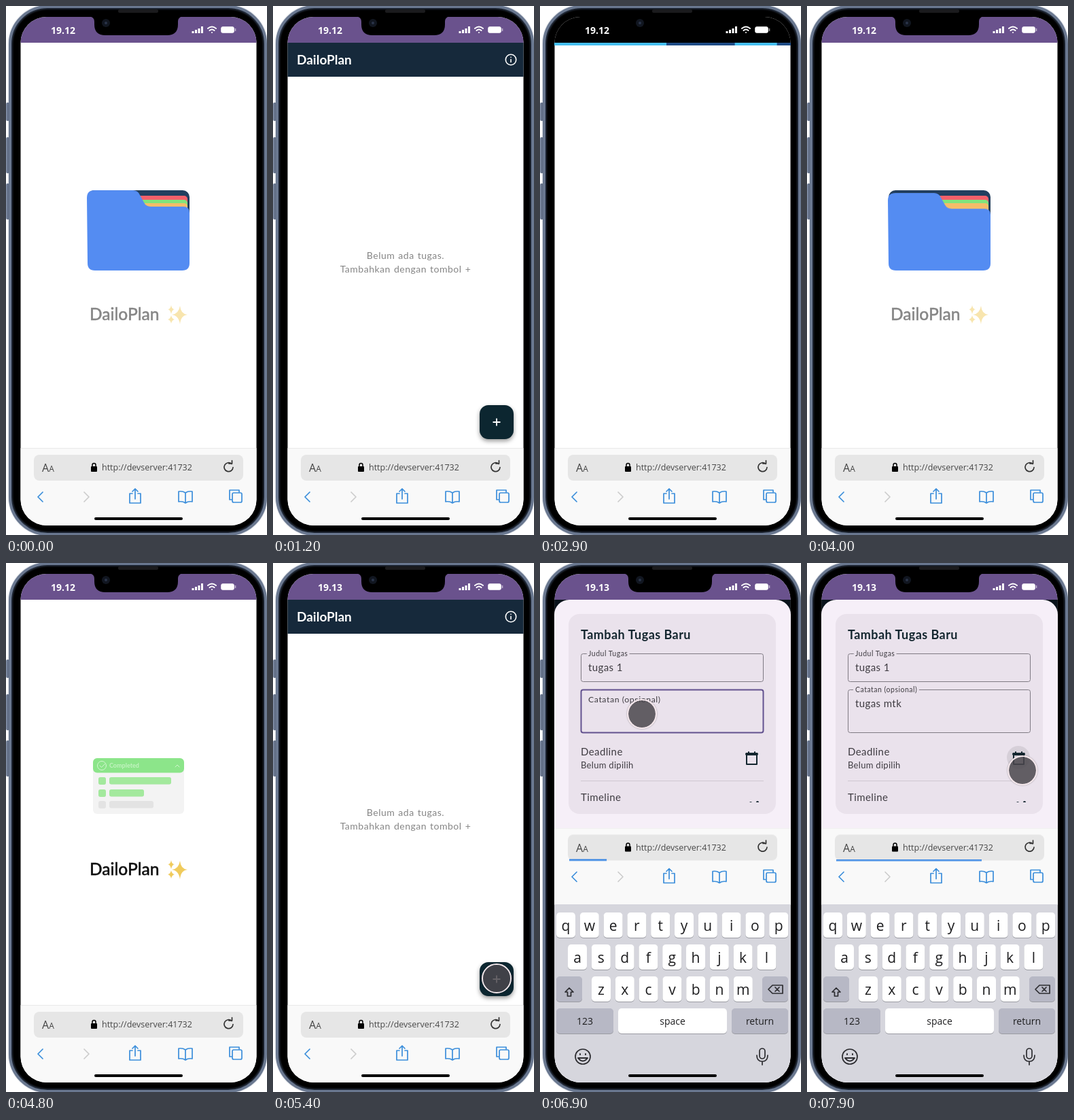
Write an HTML page that moves like this. It is 384 by 778 pixels and loops after 8 s.

```html
<!DOCTYPE html>
<html lang="id">
<head>
<meta charset="utf-8">
<title>To-do app demo</title>
<style>
  html, body { margin: 0; width: 100%; height: 100%; overflow: hidden; background: #fff; }
  #stage { position: relative; width: 384px; height: 778px; overflow: hidden; font-family: Lato, sans-serif; }
  #stage div, #stage > svg, #screen > svg { position: absolute; }
  svg { display: block; overflow: visible; }
  .full { left: 0; top: 0; width: 384px; height: 778px; }
  .ui { font-family: "Open Sans", sans-serif; }
  .line { fill: none; stroke-linecap: round; stroke-linejoin: round; }

  .button { left: 0; width: 5px; border-radius: 2px; background: linear-gradient(90deg, #8b98b0, #36435c); }
  #body { left: 4px; top: -1px; width: 372px; height: 772px; border: 4px solid #6a7890; border-radius: 57px;
    background: #000; box-shadow: inset 0 0 0 1px #1d2635, inset 0 0 3px 1px #46546c, 0 0 2px #8d98ab; }
  #screen { left: 0; top: 0; width: 384px; height: 778px; background: #fff;
    clip-path: inset(16px 15.5px 14px 21.5px round 38px); }
  #status { left: 0; top: 0; width: 384px; height: 54px; background: #6a528d; animation: status 8s step-end infinite; }
  @keyframes status { 0% { background: #6a528d } 31.25% { background: #000 } 43.75% { background: #6a528d } }

  /* scenes */
  #splash { animation: splash 8s step-end infinite; }
  @keyframes splash { 0% { opacity: 1 } 13.1% { opacity: 0 } 45% { opacity: 1 } 64.4% { opacity: 0 } }
  #home { animation: home 8s step-end infinite; }
  @keyframes home { 0% { opacity: 0 } 13.1% { opacity: 1 } 31.25% { opacity: 0 } 64.4% { opacity: 1 } }
  #loader { left: 21px; top: 54px; width: 348px; height: 4px; overflow: hidden; background: #45bff0;
    animation: loader 8s step-end infinite; }
  @keyframes loader { 0% { opacity: 0 } 31.25% { opacity: 1 } 43.75% { opacity: 0 } }
  #loader i { position: absolute; top: 0; left: 1px; width: 264px; height: 4px;
    background: repeating-linear-gradient(90deg, #1f4c86 0 101px, transparent 101px 163px);
    animation: run 1s -.8s linear infinite; }
  @keyframes run { from { transform: translateX(-264px) } to { transform: translateX(346px) } }

  /* splash, same phase every 4 s */
  #brand { animation: brand 4s linear infinite; }
  @keyframes brand {
    0% { opacity: .5; transform: translateY(3px) } 10%, 85% { opacity: 1; transform: none }
    85.1%, 90% { opacity: 0; transform: translateY(6px) } 100% { opacity: .5; transform: translateY(3px) } }
  #folder { transform-origin: 195px 330px; animation: folder 4s linear infinite; }
  @keyframes folder {
    0%, 8%, 88%, 100% { opacity: 1; transform: none } 12%, 85% { opacity: 0; transform: scale(.9) } }
  #flap { transform-origin: 195px 389px; animation: flap 8s linear infinite; }
  @keyframes flap {
    0% { transform: none } 6% { transform: scaleY(.82) } 40%, 46% { transform: none }
    50% { transform: scaleY(.966) } 55%, 100% { transform: scaleY(.82) } }
  #list { transform-origin: 195px 328px; animation: list 4s ease-out infinite; }
  @keyframes list {
    0%, 10% { opacity: 0; transform: scale(.85) } 15%, 80% { opacity: 1; transform: none }
    85%, 100% { opacity: 0; transform: none } }
  .fill { transform-origin: 136px 0; animation: 4s linear infinite; }
  #r1 { animation-name: r1 } #r2 { animation-name: r2 } #r3 { animation-name: r3 }
  @keyframes r1 { 0%, 12% { transform: scaleX(0) } 15%, 100% { transform: none } }
  @keyframes r2 { 0%, 16% { transform: scaleX(0) } 19.5%, 100% { transform: none } }
  @keyframes r3 { 0%, 20.5% { transform: scaleX(0) } 25%, 100% { transform: none } }

  /* task sheet */
  #view { left: 21px; top: 54px; width: 348px; height: 596px; overflow: hidden; animation: view 8s infinite; }
  @keyframes view {
    0%, 81.25% { height: 596px; animation-timing-function: ease-out } 83.75%, 100% { height: 336px } }
  #scrim { inset: 0; background: #0008; animation: scrim 8s linear infinite; }
  @keyframes scrim { 0%, 68.5% { opacity: 0 } 71.5%, 100% { opacity: 1 } }
  #sheet { inset: 0; background: #f6eff8; border-radius: 22px 22px 0 0; display: flex; align-items: center;
    animation: sheet 8s infinite; }
  @keyframes sheet {
    0%, 68.5% { transform: translateY(600px); animation-timing-function: ease-out } 71.5%, 100% { transform: none } }
  #card { left: 21px; width: 305px; height: 380px; max-height: calc(100% - 42px); border-radius: 16px; background: #eae2ec; }
  #clip { inset: 0 0 17px; overflow: hidden; }
  #card text { font-size: 15px; letter-spacing: .4px; fill: #3f3c42; }
  #card .sub { font-size: 13px; letter-spacing: .3px; }
  #card .label { font-size: 10.5px; letter-spacing: .5px; paint-order: stroke; stroke: #eae2ec; stroke-width: 7px; }
  .box { fill: none; stroke: #7f7a83; }
  #titleBox { animation: focus1 8s step-end infinite; }
  @keyframes focus1 { 0% { stroke: #7f7a83; stroke-width: 1px } 72.5% { stroke: #63528f; stroke-width: 2px }
    85.6% { stroke: #7f7a83; stroke-width: 1px } }
  #noteBox { animation: focus2 8s step-end infinite; }
  @keyframes focus2 { 0% { stroke: #7f7a83; stroke-width: 1px } 85.6% { stroke: #63528f; stroke-width: 2px }
    95% { stroke: #7f7a83; stroke-width: 1px } }
  #titleLabel { animation: label1 8s linear infinite; }
  @keyframes label1 {
    0%, 72.5% { transform: translate(29px, 84px) scale(1.38); fill: #3f3c42 }
    73.5%, 85.5% { transform: translate(29px, 62px); fill: #63528f }
    85.7%, 100% { transform: translate(29px, 62px); fill: #3f3c42 } }
  #noteLabel { animation: label2 8s linear infinite; }
  @keyframes label2 {
    0%, 85.6% { transform: translate(29px, 148px) scale(1.38) } 86.8%, 100% { transform: translate(29px, 115px) } }
  #hover { animation: hover 8s linear infinite; }
  @keyframes hover { 0%, 96.5% { opacity: 0 } 98%, 100% { opacity: .08 } }

  /* browser bar and keyboard */
  #chrome { animation: chrome 8s infinite; }
  @keyframes chrome {
    0%, 81.25% { transform: none; animation-timing-function: ease-out } 83.75%, 100% { transform: translateY(-260.5px) } }
  #keys { animation: keys 8s infinite; }
  @keyframes keys {
    0%, 81.25% { transform: translateY(276px); animation-timing-function: ease-out } 83.75%, 100% { transform: none } }
  #progress { transform-origin: 43px 0; animation: progress 8s linear infinite; }
  @keyframes progress { 0%, 82% { transform: scaleX(0) } 98.5%, 100% { transform: none } }

  #touch { left: -22px; top: -22px; width: 40px; height: 40px; border-radius: 50%; border: 2px solid #f3e6ea;
    background: #4b474dd9; background-clip: padding-box; box-shadow: 0 0 2px #0006; animation: touch 8s ease-in-out infinite; }
  @keyframes touch {
    0%, 65% { opacity: 0; transform: translate(329px, 611px) }
    65.6%, 68.1% { opacity: 1; transform: translate(329px, 611px) }
    72.5%, 82.5% { opacity: 1; transform: translate(124px, 257px) }
    85.6%, 93.1% { opacity: 1; transform: translate(150px, 222px) }
    98.1%, 100% { opacity: 1; transform: translate(317px, 305px) } }
</style>
</head>
<body>
<div id="stage">
  <div class="button" style="top:142px;height:27px"></div>
  <div class="button" style="top:193px;height:53px"></div>
  <div class="button" style="top:261px;height:53px"></div>
  <div id="body"></div>

  <div id="screen">
    <div id="status"></div>
    <div id="loader"><i></i></div>

    <svg id="splash" class="full" viewBox="0 0 384 778">
      <g id="folder">
        <rect x="120" y="271" width="150" height="100" rx="10" fill="#223f5f"/>
        <rect x="150" y="279" width="117" height="60" rx="5" fill="#f4606a"/>
        <rect x="150" y="285" width="117" height="60" rx="5" fill="#82e37c"/>
        <rect x="150" y="290" width="117" height="60" rx="5" fill="#f5bd69"/>
        <path id="flap" fill="#548cf2" d="M119 282q0-11 11-11h57q7 0 10 7l6 11q3 6 10 6h48q9 0 9 9v74q0 11-11 11H131q-11 0-11-11z"/>
      </g>
      <g id="list">
        <rect x="128" y="287" width="134" height="82" rx="6" fill="#f3f3f3"/>
        <rect x="128" y="287" width="134" height="21.500" rx="6" fill="#8ce58a"/>
        <g class="line" stroke="#d3f7d1"><circle cx="141" cy="298" r="6.500"/><path d="M138 298l2.500 2.500 5-5M249 300l3-3 3 3"/></g>
        <text x="152" y="301" font-size="9" font-weight="700" fill="#c3f3c1">Completed</text>
        <g id="rows"></g>
      </g>
      <g id="brand">
        <text x="123" y="459" font-size="24.500" font-weight="500" fill="#0d0d0d" stroke="#0d0d0d" stroke-width=".4">DailoPlan</text>
        <path fill="#f0cb5c" d="M256 438q1 12 11 13-10 1-11 14-2-13-12-14 10-1 12-13zM243 437q1 6 5 6-4 1-5 7-1-6-5-7 4 0 5-6zM243 452q1 5 5 6-4 1-5 6-1-5-5-6 4-1 5-6z"/>
      </g>
    </svg>

    <svg id="home" class="full" viewBox="0 0 384 778">
      <rect y="54" width="384" height="50" fill="#16293b"/>
      <text x="35" y="86" font-size="19" font-weight="700" fill="#fff">DailoPlan</text>
      <g class="line" stroke="#fff" stroke-width="1.600"><circle cx="350" cy="79" r="7.700"/><path d="M350 78.500v4M350 75.300v.1"/></g>
      <g text-anchor="middle" font-size="14" fill="#858585" letter-spacing=".5" word-spacing="1">
        <text x="195" y="372">Belum ada tugas.</text><text x="195" y="392">Tambahkan dengan tombol +</text>
      </g>
      <rect x="304" y="587" width="50" height="50" rx="13" fill="#0c2630" style="filter:drop-shadow(0 3px 3px #0006)"/>
      <path d="M323.500 612h11M329 606.500v11" stroke="#fff" stroke-width="1.800"/>
    </svg>

    <div id="view">
      <div id="scrim"></div>
      <div id="sheet"><div id="card"><div id="clip">
        <svg width="305" height="380">
          <text x="18" y="37" style="font-size:18px;font-weight:700;letter-spacing:.45px;fill:#14262f">Tambah Tugas Baru</text>
          <rect id="titleBox" class="box" x="18.500" y="58.500" width="268" height="41" rx="3"/>
          <rect id="noteBox" class="box" x="18.500" y="111.500" width="268" height="63" rx="3"/>
          <text id="titleLabel" class="label">Judul Tugas</text>
          <text id="noteLabel" class="label">Catatan (opsional)</text>
          <text id="title" x="29" y="84" xml:space="preserve"></text>
          <text id="note" x="29" y="137" xml:space="preserve"></text>
          <text x="18" y="208">Deadline</text><text class="sub" x="18" y="227">Belum dipilih</text>
          <text x="18" y="275">Timeline</text><text class="sub" x="18" y="295">Belum dipilih</text>
          <path d="M18 245.500h269M18 313.500h269" stroke="#cfc8d1"/>
          <circle id="hover" cx="269" cy="211" r="17"/>
          <g class="line" stroke="#14262f" stroke-width="2">
            <path d="M262 205h15v16h-15z"/><path d="M262 206h15" stroke-width="4"/><path d="M265 203v1M274 203v1"/>
            <path d="M262 284l6-6 5 5 5-6"/>
            <path d="M262 284v.1M268 278v.1M273 283v.1M278 277v.1" stroke-width="4"/>
          </g>
          <text class="sub" x="151" y="353">Batal</text>
          <rect x="199" y="334" width="88" height="29" rx="10" fill="#0c2630"/>
          <text x="243" y="353" text-anchor="middle" style="font-size:13px;letter-spacing:0;fill:#fff">Tambah</text>
        </svg>
      </div></div></div>
    </div>

    <svg class="full ui" viewBox="0 0 384 778">
      <g id="chrome">
        <rect y="651" width="384" height="390" fill="#f9f9f9"/>
        <path d="M0 650.500h384" stroke="#e9e9e9"/>
        <rect x="41" y="660" width="308" height="38" rx="8" fill="#e6e6e6"/>
        <rect id="progress" x="43" y="696" width="214" height="2.500" fill="#3584e4"/>
        <text x="53" y="685" font-size="16" fill="#444">A<tspan font-size="12">A</tspan></text>
        <rect x="125" y="677" width="9" height="8" rx="1"/><path class="line" d="M127 677v-2a2.500 2.500 0 0 1 5 0v2" stroke="#000" stroke-width="1.500"/>
        <text x="141" y="683" font-size="12.500" fill="#484848">http://devserver:41732</text>
        <path class="line" d="M332 673.500a6.500 6.500 0 1 0 2 5M328 673h4.500v-4.500" stroke="#333" stroke-width="1.700"/>
        <g class="line" stroke="#3b8edb" stroke-width="1.700">
          <path d="M54 715l-7 7 7 7"/><path d="M115 715l7 7-7 7" stroke="#ccc"/>
          <path d="M186 717h-4v14h16v-14h-4M190 725v-14M186 714l4-4 4 4"/>
          <path d="M264 716q-4-3-10-2v15q6-1 10 2 4-3 10-2v-15q-6-1-10 2zv15"/>
          <path d="M332 726h-3v-14h14v3"/><rect x="333" y="716" width="14" height="14" rx="2"/>
        </g>
      </g>
      <g id="keys">
        <rect y="502" width="384" height="276" fill="#d6d6dd"/>
        <g id="caps" text-anchor="middle" fill="#1d1d1f"></g>
        <g class="line" stroke="#2c2c30" stroke-width="1.700">
          <path d="M43 625l-6 6h3.500v6h5v-6h3.500z"/>
          <path d="M342 621h15v12h-15l-6-6zM346 624l6 6M352 624l-6 6"/>
          <circle cx="63" cy="726" r="11"/><path d="M56 728q7 9 14 0zM59 722v1M67 722v1" stroke-width="2"/>
          <rect x="323" y="714" width="8" height="15" rx="4"/><path d="M319 724q0 9 8 9t8-9M327 733v5"/>
        </g>
      </g>
      <rect x="130" y="752" width="130" height="4" rx="2"/>
    </svg>
  </div>

  <svg class="full ui" viewBox="0 0 384 778">
    <path d="M122 15q8 1 8 8v4q0 16 16 16h91q16 0 16-16v-4q0-7 8-8z"/>
    <rect x="165" y="5" width="59" height="5" rx="2" fill="#1b1b1d"/>
    <circle cx="147" cy="25" r="6" fill="#111620"/><circle cx="147" cy="25" r="2" fill="#2a3348"/>
    <text id="clock" x="66" y="41" font-size="14" font-weight="700" fill="#fff">19.12</text>
    <path d="M275 40v-3M279.500 40v-5M284 40v-7M288.500 40v-10" stroke="#fff" stroke-width="3"/>
    <g class="line" stroke="#fff" stroke-width="2"><path d="M297 33q6-5 12 0M299.500 36q3.500-3 7 0M303 39v.1"/></g>
    <rect x="316.500" y="30.500" width="19" height="9" rx="2.500" fill="#fff" stroke="#fff9"/><path d="M337.500 33v4" stroke="#fff9" stroke-width="1.500"/>
  </svg>
  <div id="touch"></div>
</div>

<script>
  const $ = id => document.getElementById(id);

  const row = (i, y, w, color) => `<g ${i ? `id="r${i}" class="fill"` : ""} fill="${color}">
    <rect x="136" y="${y}" width="11" height="11" rx="3"/><rect x="152" y="${y}" width="${w}" height="10.5" rx="3"/></g>`;
  $("rows").innerHTML = [[315, 91], [333, 51], [350, 65]]
    .map(([y, w], i) => row(0, y, w, "#e3e3e3") + row(i + 1, y, w, "#a3e99d")).join("");

  const key = (x, y, w, label, size = 21, fill = "#fff") =>
    `<rect x="${x}" y="${y + 1}" width="${w}" height="37" rx="5" fill="#9a9ba2"/>
     <rect x="${x}" y="${y}" width="${w}" height="37" rx="5" fill="${fill}"/>
     <text x="${x + w / 2}" y="${y + 19 + size * .36}" font-size="${size}">${label}</text>`;
  const letters = (text, x, y) => [...text].map((c, i) => key(x + i * 34.8 - 14, y, 28, c)).join("");
  const gray = "#b7b8c5";
  $("caps").innerHTML = letters("qwertyuiop", 38, 514) + letters("asdfghjkl", 55, 561) + letters("zxcvbnm", 90, 608)
    + key(24, 608, 38, "", 14, gray) + key(327, 608, 38, "", 14, gray)
    + key(24, 655, 84, "123", 14, gray) + key(115, 655, 160, "space", 14) + key(282, 655, 83, "return", 14, gray);

  const typed = (text, t, start, step, blur) =>
    text.slice(0, Math.max(0, Math.floor((t - start) / step) + 1)) + (t >= start && t < blur ? "|" : "");

  function draw(now) {
    const t = now % 8000;
    $("title").textContent = typed("tugas 1", t, 5850, 58, 6850);
    $("note").textContent = typed("tugas mtk", t, 6930, 60, 7600);
    $("clock").textContent = t < 5300 ? "19.12" : "19.13";
    requestAnimationFrame(draw);
  }
  draw(performance.now());
</script>
</body>
</html>
```
